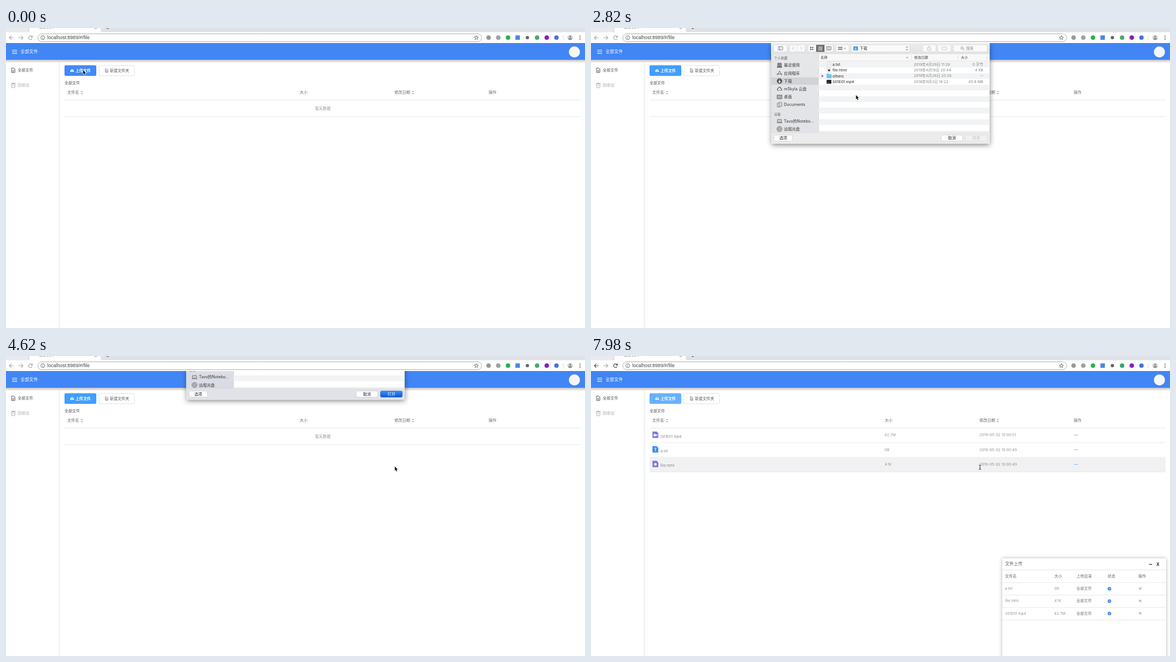
An HTML page with a canvas that plays this animation: 1039 px wide and 539 px high, repeating every 8 s.

```html
<!DOCTYPE html>
<html lang="zh-CN">
<head>
<meta charset="utf-8">
<title>全部文件</title>
<style>
html, body { margin: 0; width: 100%; height: 100%; overflow: hidden; background: #fff; }
canvas { display: block; width: 1039px; height: 539px; }
</style>
</head>
<body>
<canvas id="stage"></canvas>
<script>
const W = 1039, H = 539, LOOP = 8000, STEP = 60;
const canvas = document.getElementById('stage');
const c = canvas.getContext('2d');
const dpr = window.devicePixelRatio || 1;
canvas.width = W * dpr;
canvas.height = H * dpr;

const UI = 'Inter, "Noto Sans CJK SC", "Noto Sans CJK", sans-serif';
const BLUE = '#409eff';

// ---- helpers ----
const ramp = (t, a, b) => Math.min(1, Math.max(0, (t - a) / (b - a)));
const smooth = p => p * p * (3 - 2 * p);
const mix = (a, b, p) => a + (b - a) * p;
const grey = v => `rgb(${v},${v},${v})`;

function text(s, x, y, size = 7, color = '#606266', weight = 400, align = 'left', font = UI) {
  c.font = `${weight} ${size}px ${font}`;
  c.fillStyle = color;
  c.textAlign = align;
  c.textBaseline = 'middle';
  c.fillText(s, x, y);
}
function rect(x, y, w, h, color) {
  c.fillStyle = color;
  c.fillRect(x, y, w, h);
}
function box(x, y, w, h, r, fill, stroke, lw = 0.7) {
  c.beginPath();
  c.roundRect(x, y, w, h, r);
  if (fill) { c.fillStyle = fill; c.fill(); }
  if (stroke) { c.strokeStyle = stroke; c.lineWidth = lw; c.stroke(); }
}
function disc(x, y, r, fill, stroke, lw = 0.8) {
  c.beginPath();
  c.arc(x, y, r, 0, Math.PI * 2);
  if (fill) { c.fillStyle = fill; c.fill(); }
  if (stroke) { c.strokeStyle = stroke; c.lineWidth = lw; c.stroke(); }
}
// Each argument after the width is one polyline: [x, y, x, y, ...]
function lines(color, lw, ...paths) {
  c.strokeStyle = color;
  c.lineWidth = lw;
  c.beginPath();
  for (const p of paths)
    for (let i = 0; i < p.length; i += 2) c[i ? 'lineTo' : 'moveTo'](p[i], p[i + 1]);
  c.stroke();
}
function poly(color, ...p) {
  c.fillStyle = color;
  c.beginPath();
  for (let i = 0; i < p.length; i += 2) c[i ? 'lineTo' : 'moveTo'](p[i], p[i + 1]);
  c.closePath();
  c.fill();
}
function vertical(y0, y1, from, to) {
  const g = c.createLinearGradient(0, y0, 0, y1);
  g.addColorStop(0, from);
  g.addColorStop(1, to);
  return g;
}
const cross = (x, y, r, color, lw) =>
  lines(color, lw, [x - r, y - r, x + r, y + r], [x - r, y + r, x + r, y - r]);

// ---- browser ----
function activity(t) {
  if (t < 1600) return ramp(t, 120, 300);
  if (t < 4700) return 1 - ramp(t, 1680, 1860);
  return ramp(t, 4800, 4980);
}

function browser(t) {
  const on = activity(t);
  const ink = grey(Math.round(mix(165, 75, on)));
  rect(0, 0, W, 8, '#dee1e6');
  box(-8, -8, 48, 15, 4, '#e8eaed');
  box(42, -8, 128, 18, 4, '#fff');
  text('全部文件', 59, -2, 7, '#555');
  cross(161, 0, 2, '#777', 0.8);
  lines('#555', 1, [180, 0, 185, 0], [182.5, 0, 182.5, 2]);
  rect(0, 7.5, W, 19.5, '#fff');

  lines(ink, 1.1, [13.5, 17.5, 6, 17.5], [9.5, 13.8, 6, 17.5, 9.5, 21.2]);
  lines('#a8a8a8', 1.1, [22.5, 17.5, 30.5, 17.5], [27, 13.8, 30.5, 17.5, 27, 21.2]);
  c.strokeStyle = ink;
  c.lineWidth = 1.1;
  c.beginPath();
  c.arc(44, 17.3, 3.3, 0.5, 5.6);
  c.stroke();
  poly(ink, 47.8, 13.2, 47.8, 17, 44, 17);

  box(57, 10.5, 796.5, 14, 7, '#fff', '#a5a7aa', 0.9);
  disc(66, 17.3, 3.6, null, '#555', 0.8);
  rect(65.6, 15.2, 0.9, 0.9, '#555');
  rect(65.6, 16.8, 0.9, 2.5, '#555');
  text('localhost:8989/#/file', 74, 17.6, 8.6, '#444', 400, 'left', '"Liberation Sans", sans-serif');

  c.beginPath();
  for (let i = 0; i < 10; i++) {
    const a = -Math.PI / 2 + i * Math.PI / 5, r = i % 2 ? 1.7 : 4;
    c.lineTo(844 + r * Math.cos(a), 17.5 + r * Math.sin(a));
  }
  c.closePath();
  c.strokeStyle = '#555';
  c.lineWidth = 0.8;
  c.stroke();

  ['#999', '#a0a0a0', '#28b04a', '#4a86e0', '#666', mixGreen(on), '#8b1fb0', '#4672d8']
    .forEach((color, i) => {
      const x = 866 + i * 17.4;
      if (i === 3) rect(x - 4, 13.3, 8, 8, color);
      else disc(x, 17.3, i === 4 ? 3 : 4, color);
    });
  rect(999.6, 13, 0.8, 9, '#ccc');
  disc(1012.3, 17.3, 5, '#d4d6d9');
  disc(1012.3, 15.8, 1.7, '#85888c');
  box(1009.2, 18.2, 6.2, 2.7, 1.3, '#85888c');
  for (let i = -1; i < 2; i++) disc(1030, 17.4 + i * 3, 0.9, '#555');
}
const mixGreen = on => `rgb(${Math.round(mix(80, 60, on))},${Math.round(mix(165, 160, on))},110)`;

// ---- page ----
function docIcon(x, y, color) {
  lines(color, 0.9, [x - 3, y - 4, x + 1, y - 4, x + 3, y - 2, x + 3, y + 4, x - 3, y + 4, x - 3, y - 4.4],
    [x - 1.5, y, x + 1.5, y], [x - 1.5, y + 2, x + 1.5, y + 2]);
}
function sorter(x, y) {
  poly('#b4b7bd', x - 2.2, y - 1, x + 2.2, y - 1, x, y - 3.4);
  poly('#b4b7bd', x - 2.2, y + 1, x + 2.2, y + 1, x, y + 3.4);
}
function cloud(x, y, color) {
  disc(x - 1.6, y + 0.6, 1.7, color);
  disc(x + 1.7, y + 0.7, 1.6, color);
  disc(x, y - 0.6, 2.1, color);
}

function fileIcon(kind, x, y) {
  const color = kind === 'txt' ? '#3d8df0' : '#7b78dc';
  poly(color, x, y, x + 7.6, y, x + 10.5, y + 3, x + 10.5, y + 11.5, x, y + 11.5);
  if (kind === 'txt') text('T', x + 5.2, y + 6.4, 7, '#fff', 700, 'center');
  else if (kind === 'html') disc(x + 5.2, y + 6.4, 2.5, '#e4e3fa');
  else {
    rect(x + 2, y + 4.4, 4.5, 4, '#fff');
    poly('#fff', x + 6.7, y + 6.2, x + 8.8, y + 4.4, x + 8.8, y + 8.4);
  }
}

const FILES = [
  { name: 'a.txt', kind: 'txt', size: '0B', date: '2019-05-02 10:00:49', done: 5340 },
  { name: 'file.html', kind: 'html', size: '4.1K', date: '2019-05-02 10:00:49', done: 5460 },
  { name: 'S01E01.mp4', kind: 'mp4', size: '62.7M', date: '2019-05-02 10:00:51', done: 7620 }
];
const LISTED = 5520, RELISTED = 7740;

function page(t) {
  rect(0, 57, W, 6, vertical(57, 63, 'rgba(0,0,0,.25)', 'rgba(0,0,0,0)'));
  rect(0, 27, W, 30, '#4285f4');
  lines('#fff', 1, [11, 39.8, 20, 39.8], [11, 42.8, 20, 42.8], [11, 45.8, 20, 45.8]);
  text('全部文件', 26, 42.5, 7.8, '#fff');
  disc(1020, 43, 10, '#f6f6f6');

  rect(95, 60, 0.9, H, '#dfe0e2');
  docIcon(13, 76, '#444');
  text('全部文件', 21, 76, 6.9, '#555');
  box(10, 100.4, 6, 6.8, 0.5, null, '#aaa', 0.9);
  lines('#aaa', 0.9, [8.8, 99.8, 17.2, 99.8], [11.5, 98.8, 14.5, 98.8], [11.5, 103.5, 14.5, 103.5]);
  text('回收站', 21, 103.4, 6.9, '#aaa');

  const light = (t >= 600 && t < 1740) || t >= 4920;
  box(105, 67, 57, 19, 2, light ? '#66b1ff' : t < 600 ? '#4089f7' : BLUE);
  cloud(118.6, 76.6, '#fff');
  poly(BLUE, 118.6, 75, 117.3, 77, 119.9, 77);
  text('上传文件', 124.7, 76.6, 6.9, '#fff', 700);
  box(167.2, 67.3, 63.6, 18.5, 2, '#fff', '#dcdfe6', 0.9);
  c.save();
  c.translate(180.5, 76.5);
  c.scale(0.75, 0.75);
  docIcon(0, 0, '#555');
  c.restore();
  text('新建文件夹', 186.3, 76.6, 6.95, '#555', 500);

  text('全部文件', 105, 98.8, 6.9, '#555');
  text('文件名', 110, 116, 7, '#666', 500);
  text('大小', 527, 116.3, 7, '#666', 500);
  text('修改日期', 697, 116, 7, '#666', 500);
  text('操作', 866, 116.3, 7, '#666', 500);
  sorter(136.4, 116);
  sorter(730.3, 116);

  const rule = y => rect(105, y, 926, 0.9, '#e4e6ea');
  rule(129);
  if (t < LISTED) {
    text('暂无数据', 568.5, 144.6, 6.9, '#909399', 400, 'center');
    rule(158.7);
    return;
  }
  const rows = t < RELISTED ? FILES.slice(0, 2) : [FILES[2], FILES[0], FILES[1]];
  rows.forEach((f, i) => {
    const y = 142.3 + i * 26.2;
    if (i === 2) rect(105, y - 12.4, 926, 26, '#f1f1f3');
    fileIcon(f.kind, 110.3, y - 6.5);
    text(f.name, 124.8, y + 2.2, 6.7, '#666', 300);
    text(f.size, 527, y, 6.7, '#777', 300);
    text(f.date, 697, y, 6.8, '#777', 300);
    for (let d = -1; d < 2; d++) disc(870 + d * 2.5, y, 0.8, BLUE);
    rule(y + 13.1);
  });
}

// ---- upload panel ----
function percent(t) {
  const sent = [5760, 6120, 6480, 6780, 7080, 7440].filter(at => t >= at).length;
  return (sent * 15.94).toFixed(sent ? 2 : 0) + '%';
}

function panel(t) {
  const p = smooth(ramp(t, 4980, 5280));
  if (!p) return;
  c.save();
  c.translate(0, (1 - p) * 180);
  c.shadowColor = 'rgba(0,0,0,.3)';
  c.shadowBlur = 6 * dpr;
  box(738, 363.5, 294, 190, 2, '#fff');
  c.shadowColor = 'transparent';
  text('文件上传', 743, 374, 7.8, '#606266');
  lines('#222', 1.2, [1001.5, 374.4, 1007, 374.4]);
  text('X', 1017.2, 374.4, 7.5, '#222', 700, 'center');
  rect(738, 383.8, 294, 0.9, '#dfe1e5');

  const cols = [743, 831.5, 871, 927, 982];
  ['文件名', '大小', '上传目录', '状态', '操作']
    .forEach((s, i) => text(s, cols[i], 396, 6.9, '#666', 500));
  rect(738, 406.7, 294, 0.9, '#e4e6ea');
  FILES.forEach((f, i) => {
    const y = 418.2 + i * 22.2;
    text(f.name, cols[0], y, 6.7, '#777', 300);
    text(f.size, cols[1], y, 6.7, '#777', 300);
    text('全部文件', cols[2], y, 6.9, '#777');
    if (t >= f.done) {
      disc(930.3, y, 3.2, '#3b86f2');
      lines('#fff', 0.9, [928.7, y, 929.9, y + 1.2, 932, y - 1.1]);
      cross(985.5, y - 0.4, 2.2, '#666', 0.8);
    } else {
      text(i === 2 ? percent(t) : '0%', cols[3] - 0.5, y, 6.7, '#777', 300);
      lines('#666', 0.9, [984.2, y - 3, 984.2, y + 1.4], [986.8, y - 3, 986.8, y + 1.4]);
      cross(996, y - 0.4, 2.2, '#666', 0.8);
    }
    rect(738, y + 11, 294, 0.9, '#e4e6ea');
  });
  c.restore();
}

// ---- file chooser ----
const PLACES = [
  ['最近使用', 67], ['应用程序', 81.2], ['下载', 95.4], ['mSkyla 云盘', 109.6], ['桌面', 123.8],
  ['Documents', 138], ['Tavo的Notebo...', 167.3], ['远程光盘', 181.4]
];
const ENTRIES = [
  ['a.txt', '2019年4月29日 11:28', '0 字节'],
  ['file.html', '2019年4月18日 20:44', '4 KB'],
  ['others', '2019年4月28日 20:28', '--'],
  ['S01E01.mp4', '2018年9月3日 18:22', '65.8 MB']
];

function placeIcon(i, y) {
  const x = 338.3, k = '#666';
  if (i === 0) { box(x - 3.5, y - 4, 7, 5.5, 1, '#888', k); rect(x - 4.5, y + 2, 9, 2.2, k); }
  if (i === 1) lines(k, 1, [x - 4, y + 4, x, y - 4, x + 4, y + 4], [x - 5, y + 1.5, x + 5, y + 1.5]);
  if (i === 2) {
    disc(x, y, 4.8, '#555');
    lines('#fff', 1.1, [x, y - 2.8, x, y + 2.4], [x - 2, y + 0.4, x, y + 2.5, x + 2, y + 0.4]);
  }
  if (i === 3) { cloud(x, y, k); c.save(); c.translate(x, y); c.scale(1.4, 1.4); cloud(0, 0, k); c.scale(0.7, 0.65); cloud(0, 0.2, '#e2e3e6'); c.restore(); }
  if (i === 4) { box(x - 4.5, y - 3.5, 9, 7, 0.5, '#999', k); lines('#ddd', 0.6, [x - 4, y - 1, x + 4, y - 1], [x - 4, y + 1.3, x + 4, y + 1.3]); }
  if (i === 5) { box(x - 4, y - 3, 5, 7, 0.5, null, k, 0.8); box(x - 1, y - 4.3, 5, 7, 0.5, '#ddd', k, 0.8); }
  if (i === 6) { box(x - 3.8, y - 3, 7.6, 5, 0.6, '#ccc', k, 0.8); rect(x - 5, y + 2.4, 10, 1, k); }
  if (i === 7) { disc(x, y, 4.7, '#bbb', '#777'); disc(x, y, 2.7, null, '#888', 0.6); disc(x, y, 1.2, '#eee', '#777', 0.6); }
}

function entryIcon(i, y, picked) {
  if (i === 2) {
    box(422.8, y - 4, 4, 3, 0.8, '#58b4ea');
    box(422.8, y - 3, 9, 7, 0.8, '#70c3f2');
    poly('#777', 413.8, y - 2.2, 413.8, y + 2.4, 417.6, y);
  } else if (i === 3) {
    rect(422.8, y - 3.4, 8.5, 6.8, '#222');
    rect(424, y + 0.8, 3, 0.8, '#999');
  } else {
    box(424, y - 4.2, 6.4, 8.4, 0.5, picked ? '#dfe8f5' : '#fafafa', '#c4c6c8', 0.6);
    if (i === 1) disc(427.2, y, 2, '#444');
    else lines('#bbb', 0.5, [425.3, y - 1, 429, y - 1], [425.3, y + 1, 429, y + 1]);
  }
}

function chooserBar(picked) {
  rect(323, 27, 392, 20, vertical(27, 47, '#ededee', '#e1e2e3'));
  const dim = picked ? '#777' : '#b5b5b5';
  [[328, 24], [356, 28], [389, 46], [439, 24], [467, 105], [595, 24], [622, 24], [650, 61]]
    .forEach(([x, w]) => box(x, 30.3, w, 12.5, 2, '#fafafa', '#d2d2d3', 0.6));
  box(336, 33.5, 8, 6, 0.6, null, '#666', 0.8);
  lines('#666', 0.8, [338.8, 33.5, 338.8, 39.5]);
  lines('#b5b5b5', 0.9, [364.5, 33.5, 361.5, 36.5, 364.5, 39.5], [376, 33.5, 379, 36.5, 376, 39.5]);
  rect(369.7, 30.5, 0.6, 12, '#d8d8d8');
  for (let i = 0; i < 4; i++) rect(393 + i % 2 * 3.5, 33.8 + (i >> 1) * 3.5, 2.4, 2.2, '#666');
  rect(404, 30.3, 15, 12.5, '#6a6a6c');
  for (let i = 0; i < 4; i++) rect(407.5, 33.4 + i * 2, 8, 0.8, '#fff');
  box(422.5, 33.5, 8.5, 6, 0.4, null, '#666', 0.8);
  lines('#666', 0.8, [425.3, 33.5, 425.3, 39.5], [428.2, 33.5, 428.2, 39.5]);
  for (let i = 0; i < 6; i++) rect(443.5 + i % 3 * 2.7, 33.8 + (i / 3 | 0) * 3.3, 2, 2.3, '#666');
  lines('#666', 0.9, [453.8, 35.7, 455.6, 37.4, 457.4, 35.7]);
  box(470.6, 33, 8.5, 7.3, 0.8, '#45a3e6');
  lines('#fff', 0.8, [474.8, 34.8, 474.8, 38.6], [473.3, 37.2, 474.8, 38.7, 476.3, 37.2]);
  text('下载', 482, 36.8, 6.9, '#333');
  lines('#555', 0.9, [565.3, 35.2, 567, 33.3, 568.7, 35.2], [565.3, 38, 567, 39.9, 568.7, 38]);
  lines(dim, 0.8, [605.2, 35.3, 603.6, 35.3, 603.6, 40.2, 610, 40.2, 610, 35.3, 608.4, 35.3],
    [606.8, 38, 606.8, 32.5], [605.2, 34, 606.8, 32.4, 608.4, 34]);
  box(629.5, 34, 9, 5, 2, null, dim, 0.8);
  disc(666, 36, 2.2, null, '#777', 0.8);
  lines('#777', 0.9, [667.6, 37.6, 669.6, 39.6]);
  text('搜索', 673, 36.8, 6.8, '#8a8a8a');
}

function chooser(t) {
  const shown = t < 4000 ? smooth(ramp(t, 1590, 1920)) : 1 - smooth(ramp(t, 4400, 4740));
  if (!shown) return;
  const picked = t >= 3060;
  const base = shown < 1 ? '#e1e3e8' : '#ececed';
  c.save();
  c.beginPath();
  c.rect(0, 27, W, H);
  c.clip();
  c.translate(0, (shown - 1) * 181);
  c.shadowColor = 'rgba(0,0,0,.5)';
  c.shadowBlur = 9 * dpr;
  c.shadowOffsetY = 2 * dpr;
  rect(323.5, 27, 392, 181, base);
  c.shadowColor = 'transparent';

  chooserBar(picked);
  rect(323.5, 47, 85, 141, vertical(47, 188, '#e6e7e9', shown < 1 ? '#d8dbe4' : '#e2e3e6'));
  text('个人收藏', 328.5, 54.4, 6, '#666', 500);
  text('设备', 328.5, 154.8, 6, '#666', 500);
  rect(323.5, 88.7, 85, 13.4, '#d2d3d6');
  PLACES.forEach(([name, y], i) => {
    placeIcon(i, y);
    text(name, 346.3, y + 0.3, 7.1, '#333');
  });

  rect(408.5, 47, 306.5, 141, '#fff');
  rect(408.5, 47, 306.5, 12.5, '#f8f8f8');
  rect(408, 47, 0.7, 141, '#cfcfd1');
  rect(408.5, 59, 306.5, 0.7, '#d8d8d8');
  text('名称', 412, 53.2, 6.2, '#333', 500);
  text('修改日期', 580, 53.2, 6.2, '#333');
  text('大小', 663.8, 53.2, 6.2, '#333');
  lines('#555', 0.8, [565.7, 54.2, 567.5, 52.2, 569.3, 54.2]);
  for (const x of [574.8, 657.8, 710]) rect(x, 48.5, 0.6, 9.5, '#d6d6d6');

  const rowH = 10.35;
  for (let k = 0; k < 13; k++) {
    const top = 60.4 + k * rowH, y = top + rowH / 2;
    const sel = picked && k < 4 && k !== 2;
    if (sel) rect(408.5, top + 0.3, 306.5, rowH - 0.6, '#0a60d8');
    else if (k % 2 === 0) rect(408.5, top, 306.5, Math.min(rowH, 188 - top), '#f2f3f4');
    if (k > 3) continue;
    const [name, date, size] = ENTRIES[k];
    const side = sel ? '#fff' : '#858585';
    entryIcon(k, y, sel);
    text(name, 433.2, y + 0.2, 6.8, sel ? '#fff' : '#222');
    text(date, 579.3, y + 0.2, 6.65, side);
    text(size, 704, y + 0.2, 6.7, side, 400, 'right');
  }

  rect(323.5, 188, 392, 20, base);
  rect(323.5, 187.7, 392, 0.6, '#d4d4d6');
  const button = (s, x, w, fill, ink, edge) => {
    box(x, 192.2, w, 11, 2, fill, edge, 0.7);
    text(s, x + w / 2, 198, 7, ink, 400, 'center');
  };
  button('选项', 328.3, 33.5, '#fff', '#222', '#c6c6c8');
  button('取消', 628.3, 38.7, '#fff', '#222', '#c6c6c8');
  if (!picked) button('打开', 672, 39, '#f1f1f2', '#b5b5b8', '#d9d9db');
  else if (t < 4260) button('打开', 672, 39, vertical(192, 203, '#62aef9', '#1a7df5'), '#fff', '#2a7fe6');
  else button('打开', 672, 39, vertical(192, 203, '#4090f2', '#0a58d6'), '#fff', '#1560cf');
  c.restore();
}

// ---- pointer ----
const PATH = [
  [0, 138.3, 75.5], [540, 138.3, 75.5], [1080, 124.5, 76], [1980, 124.5, 76], [2460, 440, 134],
  [2820, 475.5, 120.5], [3420, 475.5, 120.5], [3900, 688, 215], [4020, 688, 215],
  [4080, 694.5, 202.5], [4260, 697.7, 198.5], [LOOP, 697.7, 198.5]
];

function pointer(t) {
  const i = PATH.findIndex(k => k[0] > t);
  const a = PATH[i - 1], b = PATH[i], p = smooth(ramp(t, a[0], b[0]));
  c.save();
  c.translate(mix(a[1], b[1], p), mix(a[2], b[2], p));
  c.lineJoin = 'round';
  if (t >= 7800) {
    lines('#333', 0.9, [-1.8, -2.6, 0.3, -2, 2.4, -2.6], [0.3, -2, 0.3, 5], [-1.8, 5.6, 0.3, 5, 2.4, 5.6], [-0.8, 2.6, 1.4, 2.6]);
  } else if (t >= 600 && t < 2040) {
    c.beginPath();
    c.roundRect(-0.9, 0, 1.9, 6, 0.9);
    c.roundRect(-2, 3.5, 6, 6, 1.6);
    c.moveTo(-1.8, 6.5);
    c.lineTo(-3.6, 4.6);
    c.lineTo(-1.4, 8.6);
    c.strokeStyle = '#222';
    c.lineWidth = 1.3;
    c.stroke();
    c.fillStyle = '#fff';
    c.fill();
    lines('#555', 0.4, [1.2, 4.5, 1.2, 6.5], [2.6, 4.7, 2.6, 6.5]);
  } else {
    const shape = [0, 0, 0, 7.6, 1.7, 6.1, 2.9, 8.9, 4.2, 8.3, 3, 5.6, 5.3, 5.5];
    lines('#fff', 1.3, [...shape, 0, 0]);
    poly('#111', ...shape);
  }
  c.restore();
}

function frame(now) {
  const t = Math.floor(now % LOOP / STEP) * STEP;
  c.setTransform(dpr, 0, 0, dpr, 0, 0);
  rect(0, 0, W, H, '#fff');
  page(t);
  browser(t);
  panel(t);
  chooser(t);
  pointer(t);
}

const start = performance.now();
function tick() {
  frame(performance.now() - start);
  requestAnimationFrame(tick);
}
tick();
</script>
</body>
</html>
```
